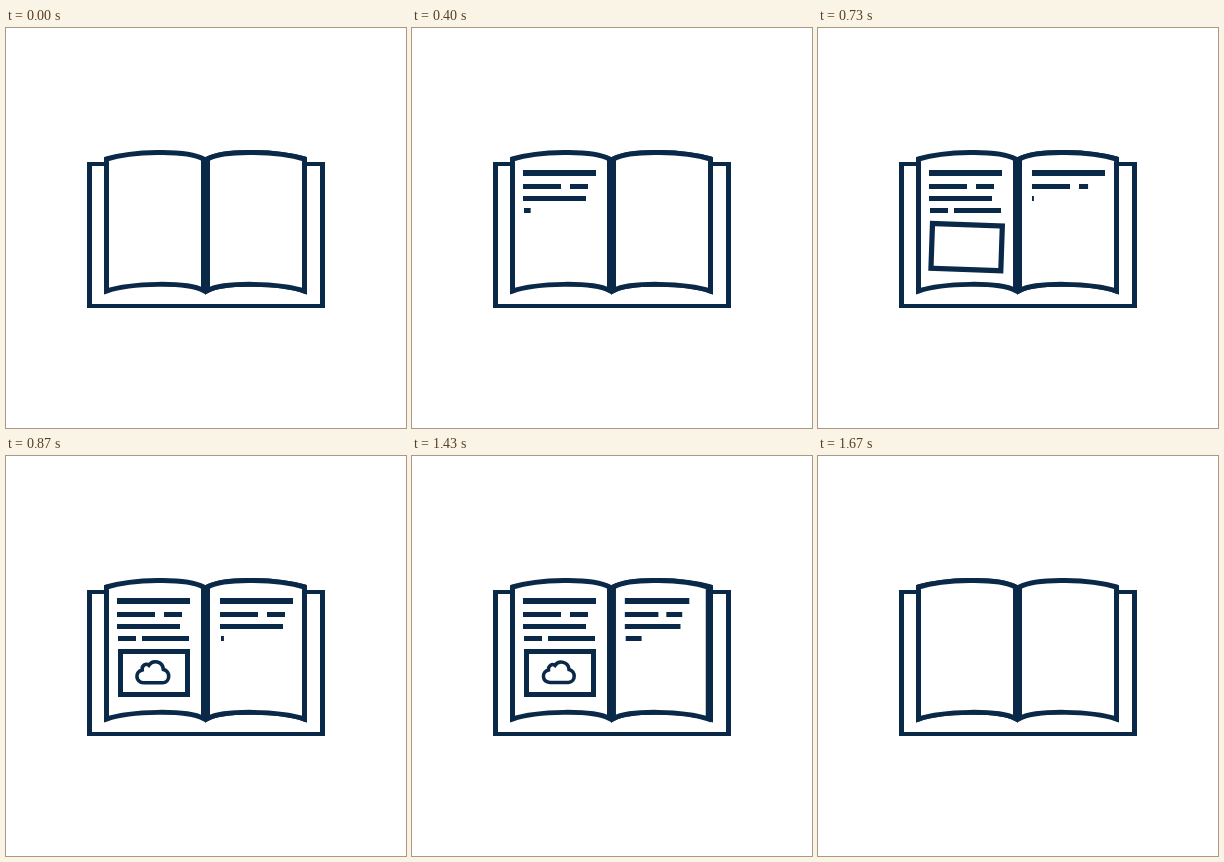
Animation of 400 by 400 pixels, one loop 2.01 s. Source, as an HTML page with a canvas:

```html
<!DOCTYPE html>
<html lang="en">
<head>
<meta charset="utf-8">
<title>Open book</title>
<style>
  html, body { margin: 0; width: 100%; height: 100%; overflow: hidden; background: #fff; }
  canvas { display: block; width: 400px; height: 400px; }
</style>
</head>
<body>
<canvas id="stage" width="400" height="400"></canvas>
<script>
const ctx = document.getElementById('stage').getContext('2d');
const INK = '#0a2847', LOOP = 2010, SPINE = 199.5;

// Words per row as [offset, width]
const LEFT_ROWS = [[[0, 73]], [[0, 38], [47, 18]], [[0, 63]], [[1, 18], [25, 47]]];
const RIGHT_ROWS = [...LEFT_ROWS.slice(0, 3), LEFT_ROWS[3].slice(0, 1)];
const CLOUD = new Path2D('M138 226.5H156.5C164 226 164 215 157 213.5C156.5 206 147 203.5 143 209.5C140 207 136 210 136.5 214C129 216 130 226 138 226.5Z');

const progress = (t, start, duration) => Math.min(1, Math.max(0, (t - start) / duration));
const sine = p => 0.5 - 0.5 * Math.cos(Math.PI * p);
const cubic = p => p < 0.5 ? 4 * p ** 3 : 1 - 4 * (1 - p) ** 3;

// Grows past full size, then settles
const settle = t => cubic(progress(t, 197, 120));
const popScale = t => 1.12 * cubic(progress(t, 0, 235)) - 0.12 * settle(t);
const popTilt = t => 5.5 * (cubic(progress(t, 97, 100)) - settle(t));

// side: 1 lies on the right, -1 on the left, 0 stands upright
function page(side) {
  const x = d => SPINE + d * side;
  ctx.beginPath();
  ctx.moveTo(x(99), 131);
  ctx.bezierCurveTo(x(74.5), 123.5, x(19.5), 121, x(2), 131);
  ctx.lineTo(x(2), 262.5);
  ctx.bezierCurveTo(x(19.5), 253.5, x(74.5), 255, x(99), 263);
  ctx.closePath();
  ctx.fillStyle = '#fff';
  ctx.fill();
  ctx.lineWidth = 5;
  ctx.stroke();
}

// Each row starts 115 ms after the last, its second word 68 ms later
function text(t, rows, left, squeeze = 1) {
  const hinge = 204;
  ctx.fillStyle = INK;
  rows.forEach((words, row) => words.forEach(([offset, width], i) => {
    const shown = sine(progress(t, 5 + row * 115 + i * 68, 120));
    const x = hinge + (left + offset - hinge) * squeeze;
    ctx.fillRect(x, row ? 144 + 12 * row : 142, width * shown * squeeze, row ? 5 : 6);
  }));
}

function placed(x, y, scale, tilt, paint) {
  if (scale <= 0) return;
  ctx.save();
  ctx.translate(x, y);
  ctx.rotate(tilt * Math.PI / 180);
  ctx.scale(scale, scale);
  paint();
  ctx.restore();
}

function picture(t) {
  placed(114.5, 195.5, popScale(t - 470), popTilt(t - 470), () => {
    ctx.lineWidth = 5;
    ctx.strokeRect(0, 0, 67, 43);
  });
  placed(146.5, 217, popScale(t - 695), 0, () => {
    ctx.translate(-146.5, -217);
    ctx.lineWidth = 3.5;
    ctx.stroke(CLOUD);
  });
}

function cover() {
  ctx.fillStyle = INK;
  ctx.fillRect(81, 134, 238, 146);
  ctx.clearRect(86, 138, 228, 138);
}

function draw(t) {
  ctx.clearRect(0, 0, 400, 400);
  ctx.strokeStyle = INK;
  cover();
  page(-1);
  text(t, LEFT_ROWS, 111);
  picture(t);
  page(1);

  const turn = progress(t, 1395, 271);
  const turning = t > 1410 ? turn : 0;
  page(1 - 2 * cubic(turning));
  if (turning < 0.5) text(t - 485, RIGHT_ROWS, 214, 1 - (2 * turning) ** 1.7);
}

// Motion is held on a 30 fps grid
function tick() {
  const t = performance.now() % LOOP;
  draw(Math.floor(t * 0.03 + 0.1) / 0.03);
  requestAnimationFrame(tick);
}
tick();
</script>
</body>
</html>
```
